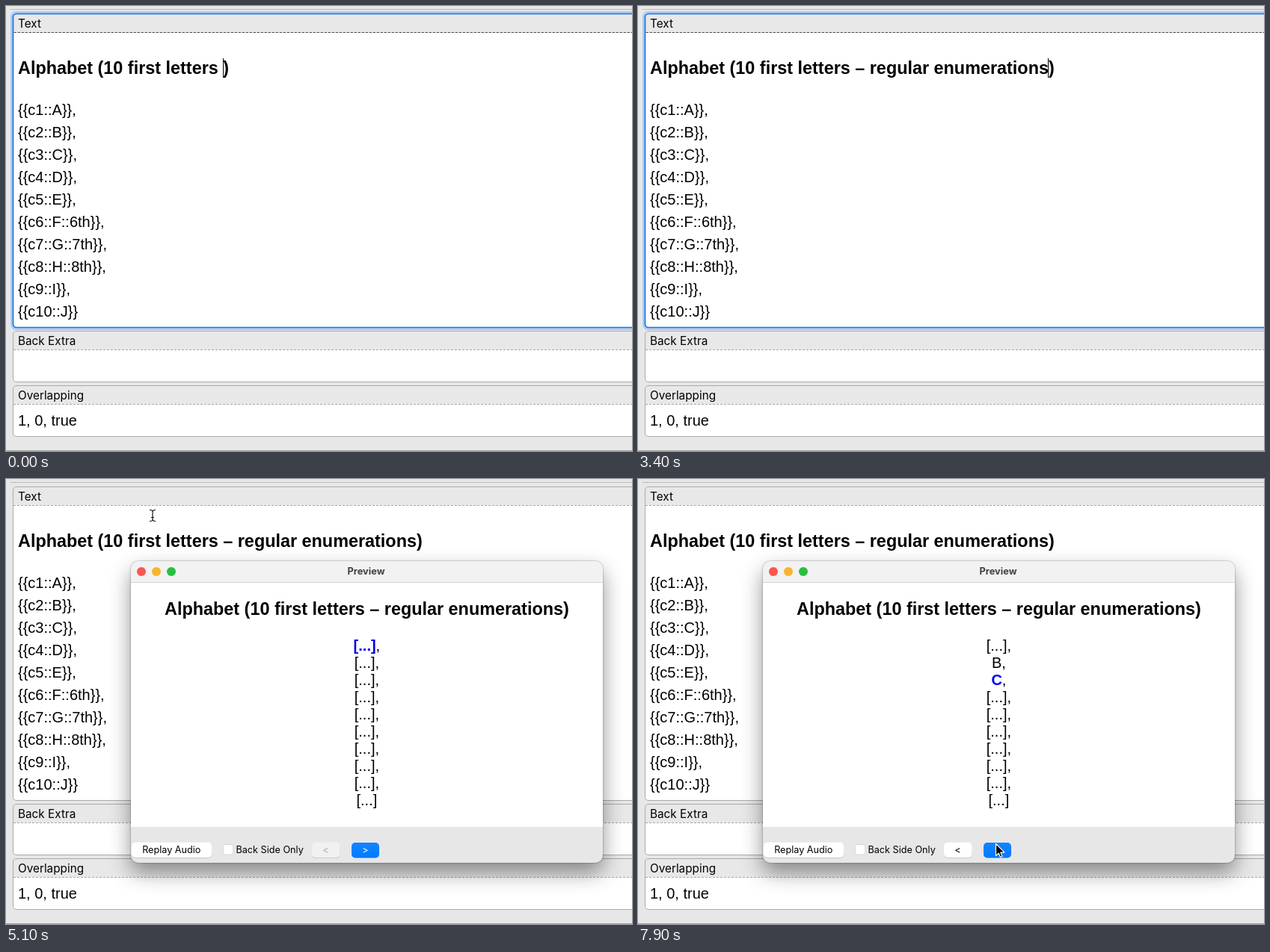
Write an HTML page that moves like this. It is 837x596 px and loops after 8000 ms.

```html
<!DOCTYPE html>
<html lang="en">
<head>
<meta charset="utf-8">
<title>Cloze editor preview</title>
<style>
  html, body { margin: 0; width: 100%; height: 100%; overflow: hidden; background: #e7e7e7; }
  svg { display: block; width: 837px; height: 596px; }
  text { white-space: pre; }
  .ui { font-family: Inter, "Open Sans", sans-serif; font-size: 12.65px; }
  .label { font-size: 15.3px; }
  .doc { font-family: "Liberation Sans", Arial, sans-serif; font-size: 20px; }
  .heading { font-size: 23.4px; font-weight: bold; }
  .mid { text-anchor: middle; }
  .active { fill: #0000e6; font-weight: bold; }
  .shadow { filter: drop-shadow(0 0 1px rgba(0,0,0,.4)) drop-shadow(0 13px 14px rgba(0,0,0,.42)); }
</style>
</head>
<body>
<svg id="stage" viewBox="0 0 837 596" xmlns="http://www.w3.org/2000/svg">
  <defs>
    <linearGradient id="blue" x2="0" y2="1">
      <stop stop-color="#1485ff"/><stop offset="1" stop-color="#007aff"/>
    </linearGradient>
  </defs>
  <rect width="837" height="596" fill="#e7e7e7"/>
  <path d="M6 4.5H837" stroke="#bdbdbd"/>
  <path d="M0 595.5H837" stroke="#a0a0a0"/>
  <g id="fields"></g>
  <g id="focus" fill="none">
    <rect x="7.5" y="8.5" width="850" height="424" rx="6" stroke="#a9cbf3" stroke-width="3"/>
    <rect x="9.5" y="10.5" width="850" height="420" rx="4.5" stroke="#1a76e2" stroke-width="1.7"/>
    <path d="M11 35.5H837" stroke="#4d4d4d" stroke-dasharray="3 2"/>
  </g>
  <g id="source" class="doc">
    <text id="title" class="heading" x="16" y="91" xml:space="preserve"></text>
    <text x="16" y="562">1, 0, true</text>
  </g>
  <rect id="caret" y="70" width="1" height="26"/>

  <g id="preview">
    <rect class="shadow" x="167" y="110" width="631" height="404" rx="10" fill="#e7e7e7"/>
    <path d="M167 138V120a10 10 0 0 1 10-10H788a10 10 0 0 1 10 10V138Z" fill="#f3f2f3"/>
    <path d="M167 138.5H798" stroke="#d3d3d3"/>
    <circle cx="181" cy="124" r="6" fill="#fb5551"/>
    <circle cx="201" cy="124" r="6" fill="#f8b42c"/>
    <circle cx="221" cy="124" r="6" fill="#27c03e"/>
    <text class="ui mid" x="481.5" y="128" style="font-size:12.8px;font-weight:700" fill="#404040">Preview</text>
    <g id="card" class="doc mid">
      <rect x="167" y="139" width="631" height="327" fill="#fff"/>
      <text class="heading" x="482.4" y="182">Alphabet (10 first letters – regular enumerations)</text>
    </g>
    <g class="ui" id="controls">
      <rect x="168" y="487.5" width="107" height="20.5" rx="5" fill="#c6c6c6"/>
      <rect x="168" y="486.8" width="107" height="20.2" rx="5" fill="#fff"/>
      <text class="mid" x="221.3" y="501">Replay Audio</text>
      <rect x="290.3" y="489.5" width="13.5" height="13.5" rx="3.2" fill="#fff" stroke="#cfcfcf" stroke-width=".8"/>
      <text x="307.5" y="501">Back Side Only</text>
      <rect x="409" y="487.5" width="37.5" height="20.5" rx="5" fill="#cbcbcb"/>
      <rect id="back" x="409" y="486.8" width="37.5" height="20.2" rx="5"/>
      <text id="backSign" class="mid" x="427.5" y="501">&lt;</text>
      <rect x="462" y="487" width="37" height="20.5" rx="5" fill="url(#blue)"/>
      <text class="mid" x="480.5" y="501" fill="#fff">&gt;</text>
    </g>
  </g>

  <g id="beam" fill="none" stroke-linecap="round">
    <path id="beamShape" d="M-3.5 -7.5Q0 -7.5 0 -5Q0 -7.5 3.5 -7.5M0 -5V5M-3.5 7.5Q0 7.5 0 5Q0 7.5 3.5 7.5M-1.5 2.5H1.5" stroke="#fff" stroke-width="2.6"/>
    <use href="#beamShape" id="beamCore"/>
  </g>
  <path id="arrow" d="M0 0V16L3.7 12.6L6 18L8.6 16.9L6.3 11.6H11.5Z" stroke="#fff" stroke-width="1.2" stroke-linejoin="round"/>
</svg>
<script>
const LOOP = 8000;
const NS = 'http://www.w3.org/2000/svg';
const $ = id => document.getElementById(id);
const show = (id, on) => $(id).setAttribute('visibility', on ? 'visible' : 'hidden');

function add(parent, tag, attrs, text = '') {
  const el = document.createElementNS(NS, tag);
  for (const key in attrs) el.setAttribute(key, attrs[key]);
  el.textContent = text;
  parent.append(el);
  return el;
}

function addField(label, top, bottom) {
  const g = $('fields');
  const y = top + 0.5, height = bottom - top;
  add(g, 'rect', { x: 9.5, y, width: 850, height, rx: 4.5, fill: '#fff' });
  add(g, 'path', { d: `M9.5 ${y + 25}V${y + 4.5}a4.5 4.5 0 0 1 4.5 -4.5H850V${y + 25}Z`, fill: '#e8e8e8' });
  add(g, 'path', { d: `M10 ${y + 25}H837`, stroke: '#a8a8a8', 'stroke-dasharray': '3 2' });
  add(g, 'rect', { x: 9.5, y, width: 850, height, rx: 4.5, fill: 'none', stroke: '#aaa' });
  add(g, 'text', { class: 'ui label', x: 16, y: top + 19 }, label);
}
addField('Text', 10, 430);
addField('Back Extra', 435, 503);
addField('Overlapping', 508, 576);

const letters = [...'ABCDEFGHIJ'];
const hints = { F: '::6th', G: '::7th', H: '::8th' };
const comma = i => i < letters.length - 1 ? ',' : '';
letters.forEach((letter, i) => add($('source'), 'text', { x: 16, y: 146 + 30 * i },
  `{{c${i + 1}::${letter}${hints[letter] || ''}}}${comma(i)}`));

const rows = letters.map((_, i) => {
  const row = add($('card'), 'text', { x: 482.4, y: 230 + 23 * i });
  const word = add(row, 'tspan', {});
  add(row, 'tspan', {}, comma(i));
  return word;
});

// beamCore redraws the beam in black over its white halo
$('beamCore').remove();
add($('beam'), 'path', { d: $('beamShape').getAttribute('d'), stroke: '#000', 'stroke-width': 1.1 });

const prefix = 'Alphabet (10 first letters ';
const suffix = '– regular enumerations';
// one keystroke time per suffix character, in tenths of a second
const keys = [7, 9, 10, 12, 13, 15, 16, 18, 19, 20, 21, 22, 23, 25, 26, 27, 28, 30, 31, 31, 32, 34];
const clicks = [6400, 6700, 6900, 7200, 7600];
const path = [[5000, 194, 12], [5100, 196, 49], [5300, 191, 88], [5700, 188, 119], [6200, 478.5, 488.5]];

function pointerAt(t) {
  const i = path.findIndex(p => p[0] > t);
  if (i < 0) return path[path.length - 1].slice(1);
  const [t0, x0, y0] = path[i - 1], [t1, x1, y1] = path[i];
  let k = (t - t0) / (t1 - t0);
  if (i === path.length - 1) k = k * k * (3 - 2 * k);
  return [x0 + (x1 - x0) * k, y0 + (y1 - y0) * k];
}

function drawTitle(t) {
  const typed = prefix + suffix.slice(0, keys.filter(k => k * 100 <= t).length);
  $('title').textContent = typed + ')';
  $('caret').setAttribute('x', Math.floor(16 + $('title').getSubStringLength(0, typed.length)));
  const blinkedOff = (t >= 400 && t < 700) || (t >= 3900 && t < 4400);
  show('caret', t < 5000 && !blinkedOff);
  show('focus', t < 5000);
}

function drawCard(t) {
  const step = clicks.filter(c => c <= t).length;
  const current = step >> 1, revealed = step % 2 === 1;
  rows.forEach((row, i) => {
    const visible = i === current - 1 || (i === current && revealed);
    row.textContent = visible ? letters[i] : '[...]';
    row.setAttribute('class', i === current ? 'active' : '');
  });
  $('back').setAttribute('fill', step ? '#fff' : '#f1f1f1');
  $('backSign').setAttribute('fill', step ? '#000' : '#aaa');
  $('preview').style.display = t >= 4900 ? '' : 'none';
  $('card').style.display = t >= 5100 ? '' : 'none';
}

function drawPointer(t) {
  const on = t >= path[0][0];
  const [x, y] = on ? pointerAt(t) : [0, 0];
  const overWindow = y >= 108;
  show('beam', on && !overWindow);
  show('arrow', on && overWindow);
  for (const id of ['beam', 'arrow']) $(id).setAttribute('transform', `translate(${x} ${y})`);
}

function render(time) {
  const t = Math.floor((time % LOOP) / 100) * 100;
  drawTitle(t);
  drawCard(t);
  drawPointer(t);
}

const start = performance.now();
function tick() {
  render(performance.now() - start);
  requestAnimationFrame(tick);
}
tick();
</script>
</body>
</html>
```
